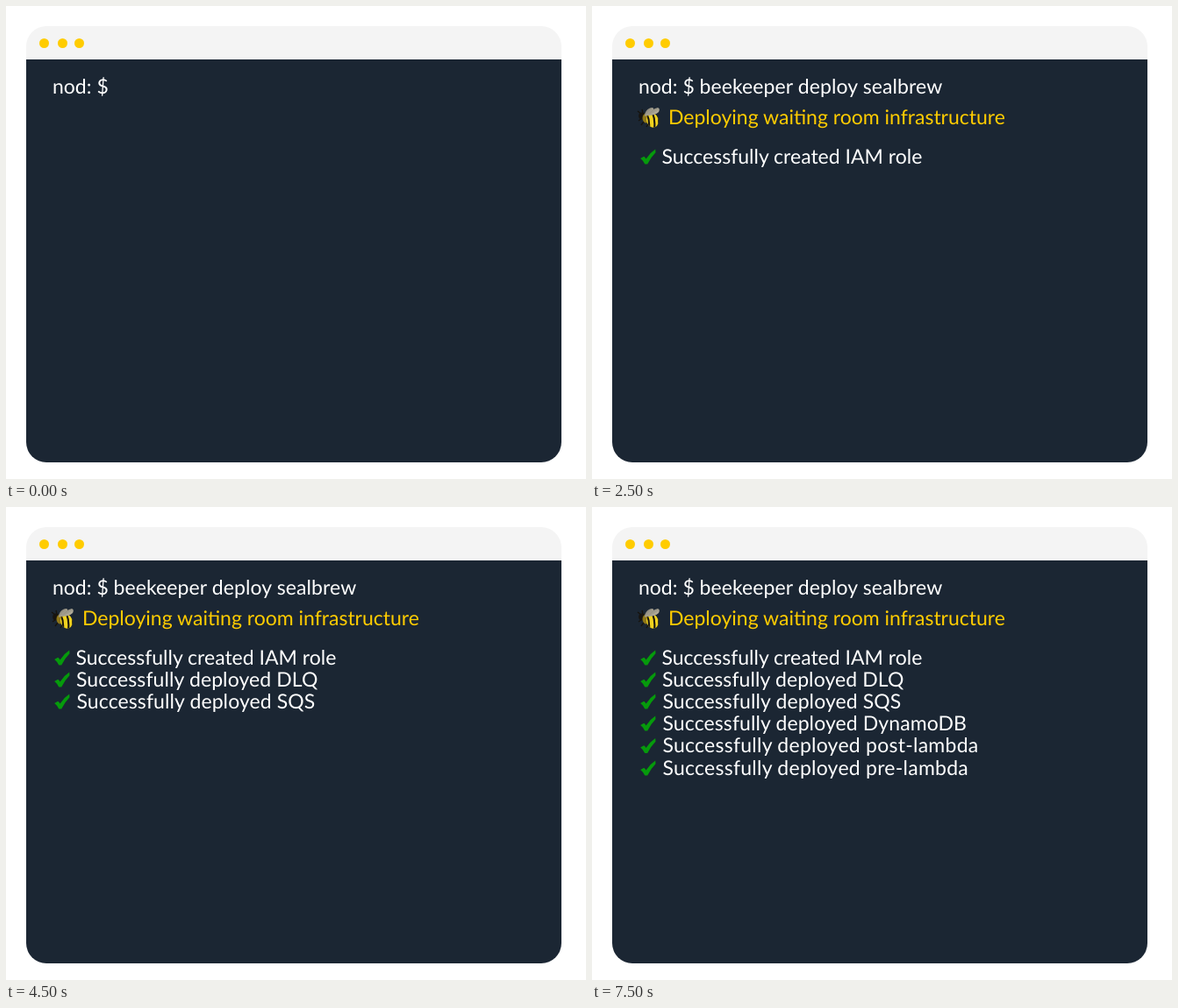
Write an HTML page that moves like this. It is 661 px wide and 540 px high and loops after 8 s.

```html
<!DOCTYPE html>
<html lang="en">
<head>
<meta charset="utf-8">
<title>Terminal deploy</title>
<style>
  html, body { margin: 0; width: 100%; height: 100%; overflow: hidden; background: #fff; }
  svg { display: block; width: 661px; height: 540px; }
  text {
    font: 400 23px Lato, "Open Sans", sans-serif;
    fill: #fff;
    text-rendering: geometricPrecision;
  }
</style>
</head>
<body>
<svg viewBox="0 0 661 540" xmlns="http://www.w3.org/2000/svg">
  <defs>
    <path id="check" d="M0 10.5 L4 8.2 Q5.6 9.2 6.4 11 Q10.4 4.4 17 0 L17.3 3.8 Q11.6 9.6 8 17 L5 17 Q3.2 13 0 10.5 Z" fill="#069a0c"/>
    <linearGradient id="wing" x1="0" y1="0" x2="1" y2="1">
      <stop offset="0" stop-color="#77746a"/>
      <stop offset="1" stop-color="#c9c3ae"/>
    </linearGradient>
    <clipPath id="abdomen"><ellipse cx="18" cy="15.5" rx="6.8" ry="8.3" transform="rotate(-20 18 15.5)"/></clipPath>
    <g id="bug">
      <path d="M1 5 L5 8 M6 3 L7 7 M5 14 L2 16 M8 17 L5 21 M13 20 L11 23" fill="none" stroke="#17130d" stroke-width="1.3"/>
      <ellipse cx="6" cy="10.5" rx="3.8" ry="4" fill="#17140f"/>
      <ellipse cx="11" cy="13" rx="4.5" ry="5.5" fill="#8f7718"/>
      <g clip-path="url(#abdomen)">
        <rect x="9" y="4" width="18" height="21" fill="#f0d21f"/>
        <path d="M11 7 Q15 15 14 25 M17 5 Q21.5 14 20 25 M24 6 Q26 15 24.5 24" fill="none" stroke="#17140f" stroke-width="2.1"/>
      </g>
      <path d="M9 11 Q9 4 15 1.5 Q20 0 19 4 Q16 9 9 11 Z" fill="url(#wing)"/>
      <path d="M12 10 Q16 3 24 1 Q27 2 25 6 Q21 10 12 10 Z" fill="url(#wing)"/>
    </g>
  </defs>
  <path d="M23 61 H633 V498 A23 23 0 0 1 610 521 H46 A23 23 0 0 1 23 498 Z" fill="#1b2633"/>
  <path d="M23 61 V46 A23 23 0 0 1 46 23 H610 A23 23 0 0 1 633 46 V61 Z" fill="#f4f4f4"/>
  <g fill="#fc0">
    <circle cx="43.5" cy="42.5" r="5.5"/>
    <circle cx="64.5" cy="42.5" r="5.5"/>
    <circle cx="83.5" cy="42.5" r="5.5"/>
  </g>
  <text x="53" y="99.5">nod: $</text>
  <g id="log"></g>
</svg>
<script>
  const LOOP = 8000;
  const log = document.getElementById('log');

  // start ms, x, baseline, tracking, text, icon
  const lines = [
    [500, 122.5, 99.5, .1, 'beekeeper deploy sealbrew'],
    [1500, 87, 135, 0, 'Deploying waiting room infrastructure', 'bug'],
    [2500, 79.5, 179.5, 0, 'Successfully created IAM role', 'check'],
    [3500, 80, 204.5, .1, 'Successfully deployed DLQ', 'check'],
    [4500, 80.5, 229.5, .1, 'Successfully deployed SQS', 'check'],
    [5500, 80.5, 254.5, .1, 'Successfully deployed DynamoDB', 'check'],
    [6500, 80.5, 280, .25, 'Successfully deployed post-lambda', 'check'],
    [7500, 80.5, 305.5, .25, 'Successfully deployed pre-lambda', 'check']
  ];

  function add(parent, tag, attrs) {
    const node = document.createElementNS('http://www.w3.org/2000/svg', tag);
    for (const key in attrs) node.setAttribute(key, attrs[key]);
    return parent.appendChild(node);
  }

  for (const [start, x, y, tracking, label, icon] of lines) {
    const row = add(log, 'g', {});
    const isBug = icon === 'bug';
    if (icon) add(row, 'use', { href: '#' + icon, x: isBug ? 51 : 55.2, y: y - (isBug ? 20 : 16) });
    const text = add(row, 'text', { x, y, 'letter-spacing': tracking });
    text.textContent = label;
    if (isBug) text.style.fill = '#fc0';

    row.animate([
      { opacity: 0, offset: 0, easing: 'step-end' },
      { opacity: 1, offset: start / LOOP },
      { opacity: 1, offset: 1 }
    ], { duration: LOOP, iterations: Infinity });
  }
</script>
</body>
</html>
```
